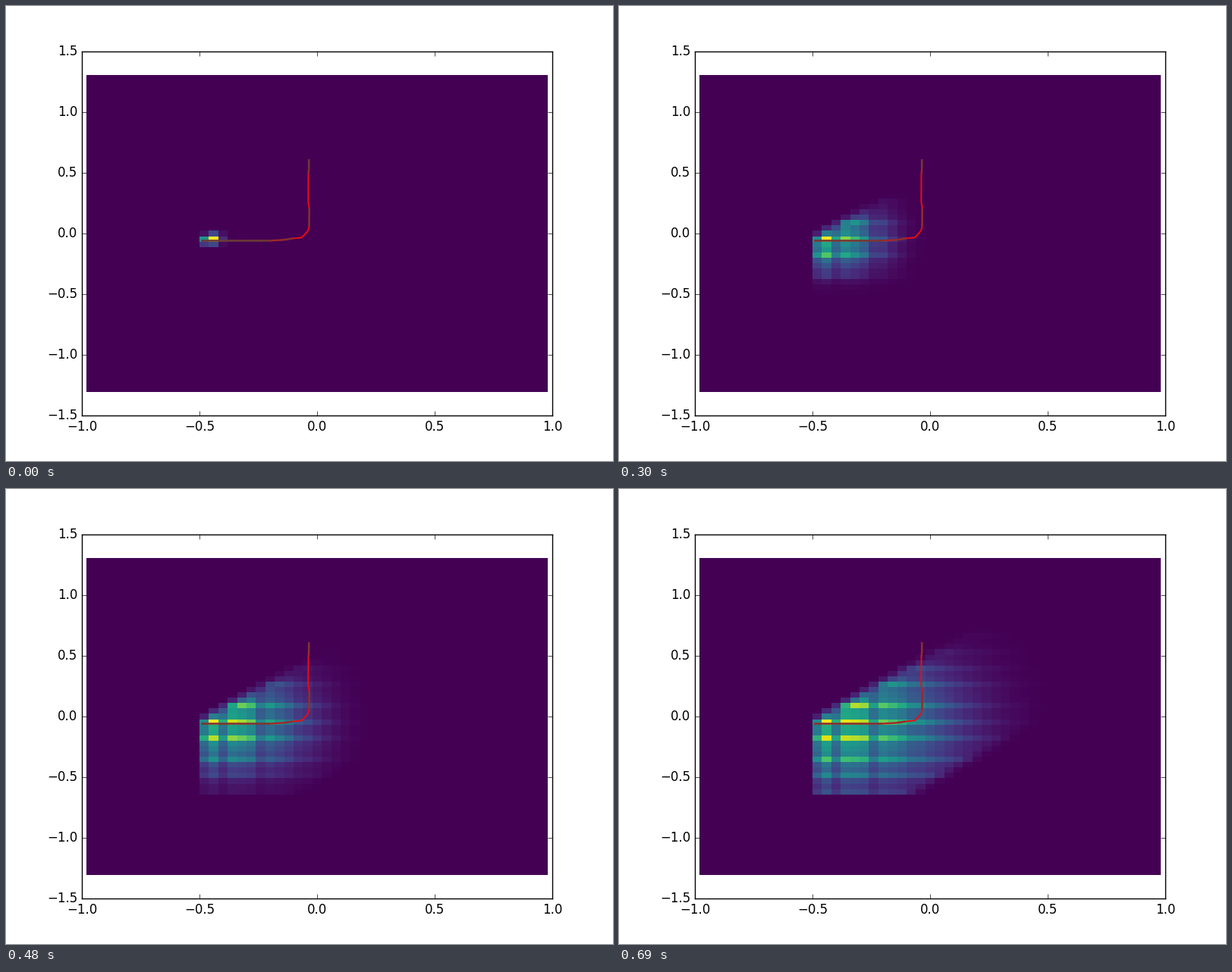
Recreate the animation shown at these times as a matplotlib script. Size 800 px wide and 600 px high, loop 0.72 s.

```python
import numpy as np
import matplotlib.pyplot as plt
from matplotlib.animation import FuncAnimation
from matplotlib.collections import LineCollection

plt.style.use("classic")

FRAMES, INTERVAL = 24, 30
ROWS, COLS = 59, 49
START_ROW, START_COL = 30, 12
FLOOR_ROW, CORNER = 43, 11

row, col = np.mgrid[:ROWS, :COLS]
step = col - START_COL
drop = row - START_ROW
dist = np.abs(drop)


def region():
    """Parallelogram of reachable cells, fading at its slanted edges."""
    above = row - (START_ROW - 1 - step)
    below = FLOOR_ROW + CORNER - step - row
    inside = (step >= 0) & (row <= FLOOR_ROW) & (above >= 0) & (below >= 0)
    fade = np.clip(.2 + .5 * np.minimum(above, below), 0, 1)
    return inside * fade * np.where(step == 0, .68, 1)


def row_weight():
    """A bright band about every 3.3 rows, weaker with distance."""
    band = np.floor((dist + .5) / 3.3) > np.floor((dist - .5) / 3.3)
    return np.where(band, 1, .62) * np.exp(-(dist / 15) ** 2)


def col_weight():
    """A dip in every fourth column, shallower to the right."""
    dip = .36 * (step % 4 == 2) * np.exp(-(step / 9) ** 4)
    return (1 - dip) * np.exp(-(step / 18) ** 2)


BASE = region() * row_weight() * col_weight()


def front(x, center, width):
    z = np.clip((x - center) / width, -6, 6)
    return 1 / (1 + np.exp(z + .06 * z ** 3))


def density(k):
    across = front(step, 1.6 + .25 * k + .0135 * k ** 2, .3 + .16 * k)
    reach = dist - .2 * (drop < 0)
    along = front(reach, .8 + .28 * k + .012 * k ** 2, .3 + .15 * k)
    grid = BASE * across * along
    return grid / grid.max()


fig = plt.figure(figsize=(8, 6), dpi=100, facecolor="white")
ax = fig.add_axes([.125, .1, .775, .8])
heat = ax.imshow(density(0), cmap="viridis", vmin=0, vmax=1, aspect="auto",
                 interpolation="nearest", extent=(-.98, .98, -1.305, 1.305))
ax.set_xlim(-1, 1)
ax.set_ylim(-1.5, 1.5)
ax.set_xticks(np.arange(-1, 1.1, .5))
ax.set_yticks(np.arange(-1.5, 1.6, .5))

RED = np.array([238, 12, 16]) / 255
BROWN = np.array([108, 58, 54]) / 255

# Key points of the path in pixels, with the dullness of the stretch before.
KEYS = np.array([
    (257, 309.5, 1), (347, 309.5, 1), (366, 308.4, .6), (378, 306.5, .8),
    (390, 305.3, 0), (398, 296.5, 0), (399.5, 291, 0), (399.7, 267, .8),
    (398.3, 258, 0), (398.5, 222, 0), (399.2, 215, .7), (399.2, 202, 1),
])
points = np.column_stack([(KEYS[:, 0] - 410) / 310, (300 - KEYS[:, 1]) / 160])
dull = KEYS[1:, 2:]
path = LineCollection(np.stack([points[:-1], points[1:]], axis=1),
                      linewidths=1.4 + .5 * dull[:, 0], zorder=3)
path.set_snap(False)
ax.add_collection(path, autolim=False)


def draw(k):
    heat.set_data(density(k))
    mix = dull * (1 - .2 * k / (FRAMES - 1))
    path.set_color(RED + (BROWN - RED) * mix)
    return heat, path


anim = FuncAnimation(fig, draw, frames=FRAMES, interval=INTERVAL,
                     repeat=True, repeat_delay=0, blit=False)
plt.show()
```
